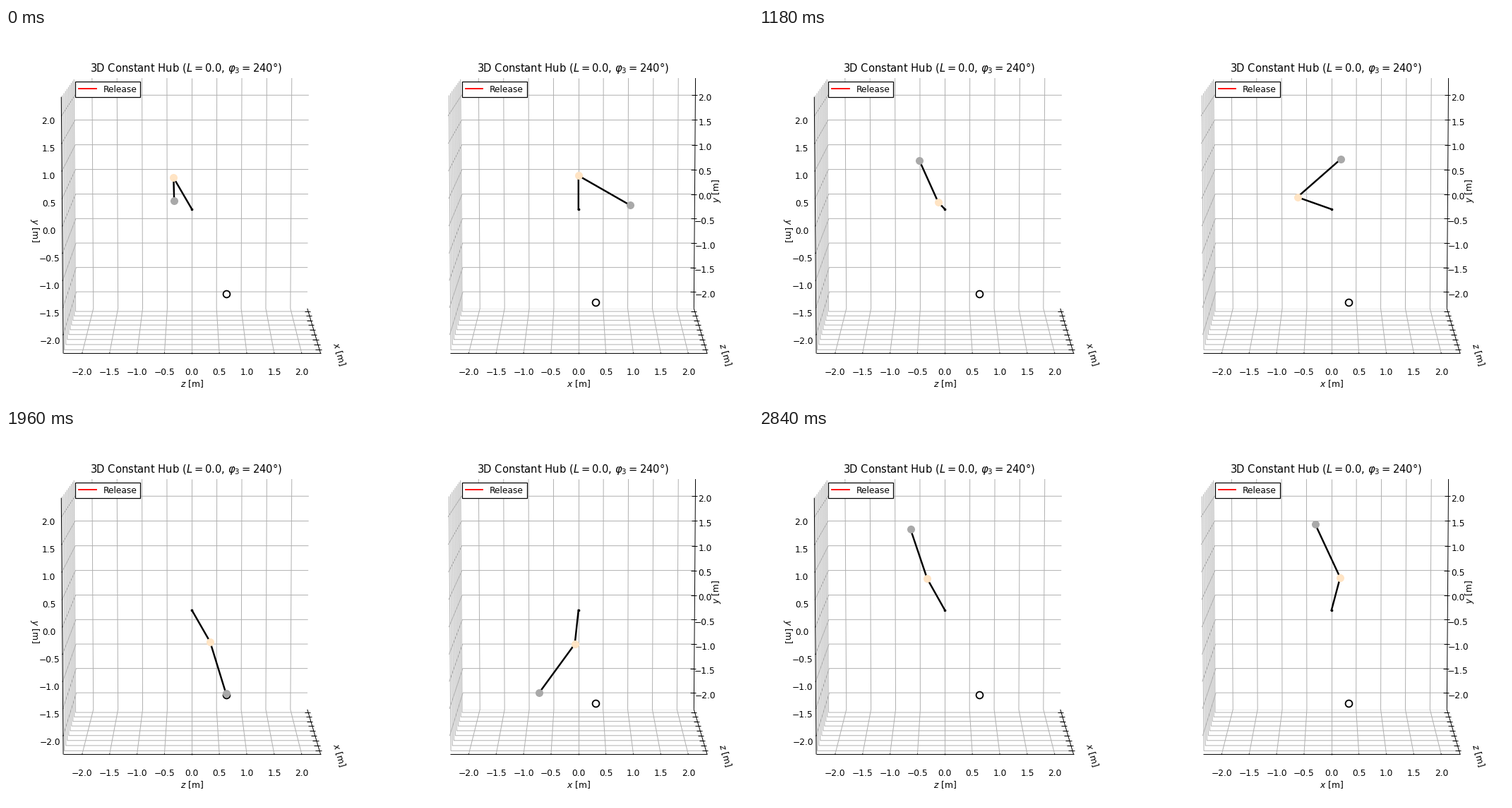
Write a matplotlib script that moves like this. It is 1058 by 529 pixels and loops after 2.86 s.

```python
import numpy as np
import matplotlib.pyplot as plt
from matplotlib.animation import FuncAnimation
from matplotlib.collections import LineCollection
from matplotlib.patches import Rectangle

W, H = 1058, 529
STEP, FRAMES = 20, 143

# Perspective camera: slightly raised, looking straight at the box
ELEV = np.radians(7.5)
UNIT, DIST, ZOOM = 0.23471, 10, 3156
CY = 257
LIM = 2.34375
TICKS = np.arange(-2, 2.1, 0.5)

# Double pendulum
L1, L2 = 0.7, 1.15
PLANE1 = np.array([[-1, 0, 0], [0, 0.866, -0.5]])
PLANE2 = np.array([[1, 0, 0], [0, 0.947, -0.322], [0, 0.322, 0.947]])
TARGET = np.array([0.318, -1.693, 0.672])

# time in ms, inner angle, outer angle, outer tilt (degrees)
KEYS = np.array([
    [0, 0, -28.65, -9.1],
    [560, 14.7, -11.4, -12.9],
    [1080, 56.5, 30, -8],
    [1180, 69, 42.9, -5.9],
    [1500, 109.5, 94, 0],
    [1620, 127, 121.5, 2],
    [1960, 174.3, 234.3, -0.3],
    [2160, 203, 308, 0],
    [2320, 229.1, 361.9, 0.3],
    [2700, 310, 452, 3],
    [2840, 346.2, 474.6, 1.4],
])
TIMES, ANGLES = KEYS[:, 0], np.radians(KEYS[:, 1:])
SLOPES = np.gradient(ANGLES, TIMES, axis=0, edge_order=2)
SLOPES[0] = 0


def angles_at(t):
    """Cubic Hermite interpolation; starts from rest."""
    i = int(np.clip(np.searchsorted(TIMES, t, side='right') - 1, 0, len(TIMES) - 2))
    h = TIMES[i + 1] - TIMES[i]
    s = (t - TIMES[i]) / h
    return ((1 + 2 * s) * (1 - s) ** 2 * ANGLES[i]
            + s * (1 - s) ** 2 * h * SLOPES[i]
            + s * s * (3 - 2 * s) * ANGLES[i + 1]
            + s * s * (s - 1) * h * SLOPES[i + 1])


def joints(t):
    a, b, tilt = angles_at(t)
    elbow = L1 * np.array([np.sin(a), np.cos(a)]) @ PLANE1
    reach = np.array([np.cos(b) * np.cos(tilt), np.sin(b) * np.cos(tilt), np.sin(tilt)])
    return np.zeros(3), elbow, elbow + L2 * reach @ PLANE2


def project(cx, right, up, near):
    """Box coordinates to stage pixels."""
    u = UNIT * (up * np.cos(ELEV) - near * np.sin(ELEV))
    d = DIST - UNIT * (up * np.sin(ELEV) + near * np.cos(ELEV))
    return cx + ZOOM * UNIT * right / d, CY - ZOOM * u / d


fig = plt.figure(figsize=(12, 6), dpi=88.167, facecolor='white')
ax = fig.add_axes([0, 0, 1, 1])
ax.set_xlim(0, W)
ax.set_ylim(H, 0)
ax.axis('off')


def label(x, y, text, size=10, **kw):
    style = dict(ha='center', va='baseline', fontsize=size, zorder=6)
    style.update(kw)
    ax.text(x, y, text, **style)


def number(v):
    return f'{v:.1f}'.replace('-', '\u2212')


class View:
    def __init__(self, cx, side):
        self.cx, self.side = cx, side
        self.draw_grid()
        self.draw_axes()
        self.draw_text()
        mark = dict(ls='', marker='o', zorder=8)
        ax.plot(*self.place(TARGET), mfc='white', mec='black', ms=8, mew=1.5,
                **{**mark, 'zorder': 5})
        self.rod, = ax.plot([], [], color='black', lw=2, zorder=7)
        ax.plot(*self.place(np.zeros(3)), color='black', ms=2, **mark)
        self.elbow, = ax.plot([], [], color='bisque', ms=8, **mark)
        self.tip, = ax.plot([], [], color='darkgray', ms=8, **mark)

    def at(self, right, up, near):
        return project(self.cx, right, up, near)

    def place(self, p):
        x, y, z = p
        r, u, n = self.at(z, y, -x) if self.side else self.at(x, y, z)
        return r, u

    def lines(self, paths, color, z):
        segs = [[self.at(*p) for p in path] for path in paths]
        ax.add_collection(LineCollection(segs, colors=color, linewidths=0.8, zorder=z))

    def draw_grid(self):
        paths = []
        for v in TICKS:
            paths.append([(v, -LIM, LIM), (v, -LIM, -LIM), (v, LIM, -LIM)])
            paths.append([(LIM, v, -LIM), (-LIM, v, -LIM), (-LIM, v, LIM)])
            paths.append([(LIM, -LIM, v), (-LIM, -LIM, v), (-LIM, LIM, v)])
        if not self.side:
            self.lines([[(-LIM, -LIM, -LIM), (LIM, -LIM, -LIM)]], '#ececec', 1)
        self.lines(paths, '#b0b0b0', 2)

    def draw_axes(self):
        out, inn = LIM + 0.0375, LIM - 0.075
        paths = [[(-LIM, -LIM, LIM), (LIM, -LIM, LIM)],
                 [(LIM, -LIM, -LIM), (LIM, -LIM, LIM)]]
        if self.side:
            paths.append([(-LIM, -LIM, LIM), (-LIM, LIM, LIM)])
        else:
            paths.append([(LIM, -LIM, -LIM), (LIM, LIM, -LIM)])
        for v in TICKS:
            paths.append([(v, -LIM, inn), (v, -LIM, out)])
            paths.append([(inn, -LIM, v), (out, -LIM, v)])
            if self.side:
                paths.append([(-LIM, v, inn), (-LIM, v, out)])
            else:
                paths.append([(inn, v, -LIM), (out, v, -LIM)])
        self.lines(paths, 'black', 4)

    def draw_text(self):
        cx = self.cx
        for v in TICKS:
            label(self.at(v, -LIM, LIM)[0], 491.5, number(v))
            if self.side:
                label(61 - v / 2, 291.7 - 78 * v, number(v))
            else:
                label(990, self.at(LIM, v, -LIM)[1] + 7.7, number(v))
        across, deep = ('z', 'x') if self.side else ('x', 'z')
        label(cx, 505, f'${across}$ [m]', va='center')
        label(cx + 208, 462.5, f'${deep}$ [m]', va='center', rotation=-74.2)
        if self.side:
            label(40.5, 287, '$y$ [m]', va='center', rotation=-90)
        else:
            label(1006, 231.5, '$y$ [m]', va='center', rotation=90)

        label(cx - 7.8, 62.3, r'3D Constant Hub ($L=0.0$, $\varphi_3=240$°)', size=12)
        x = cx - 165.2
        ax.add_patch(Rectangle((x, 76.5), 92, 22, fc='white', ec='black', lw=1, zorder=5))
        ax.plot([x + 4.9, x + 29.4], [86.5, 86.5], color='red', lw=1.5, zorder=6)
        label(x + 39.2, 91, 'Release', ha='left')

    def update(self, points):
        px = [self.place(p) for p in points]
        self.rod.set_data(*zip(*px))
        for dot, (x, y) in zip((self.elbow, self.tip), px[1:]):
            dot.set_data([x], [y])
        return [self.rod, self.elbow, self.tip]


def place(self, p):
    x, y, z = p
    return self.at(z, y, -x) if self.side else self.at(x, y, z)


View.place = place
views = [View(263.3, True), View(810.8, False)]


def draw(i):
    points = joints(i * STEP)
    return [artist for v in views for artist in v.update(points)]


anim = FuncAnimation(fig, draw, frames=FRAMES, interval=STEP,
                     init_func=lambda: draw(0), repeat=True, repeat_delay=0)
plt.show()
```
